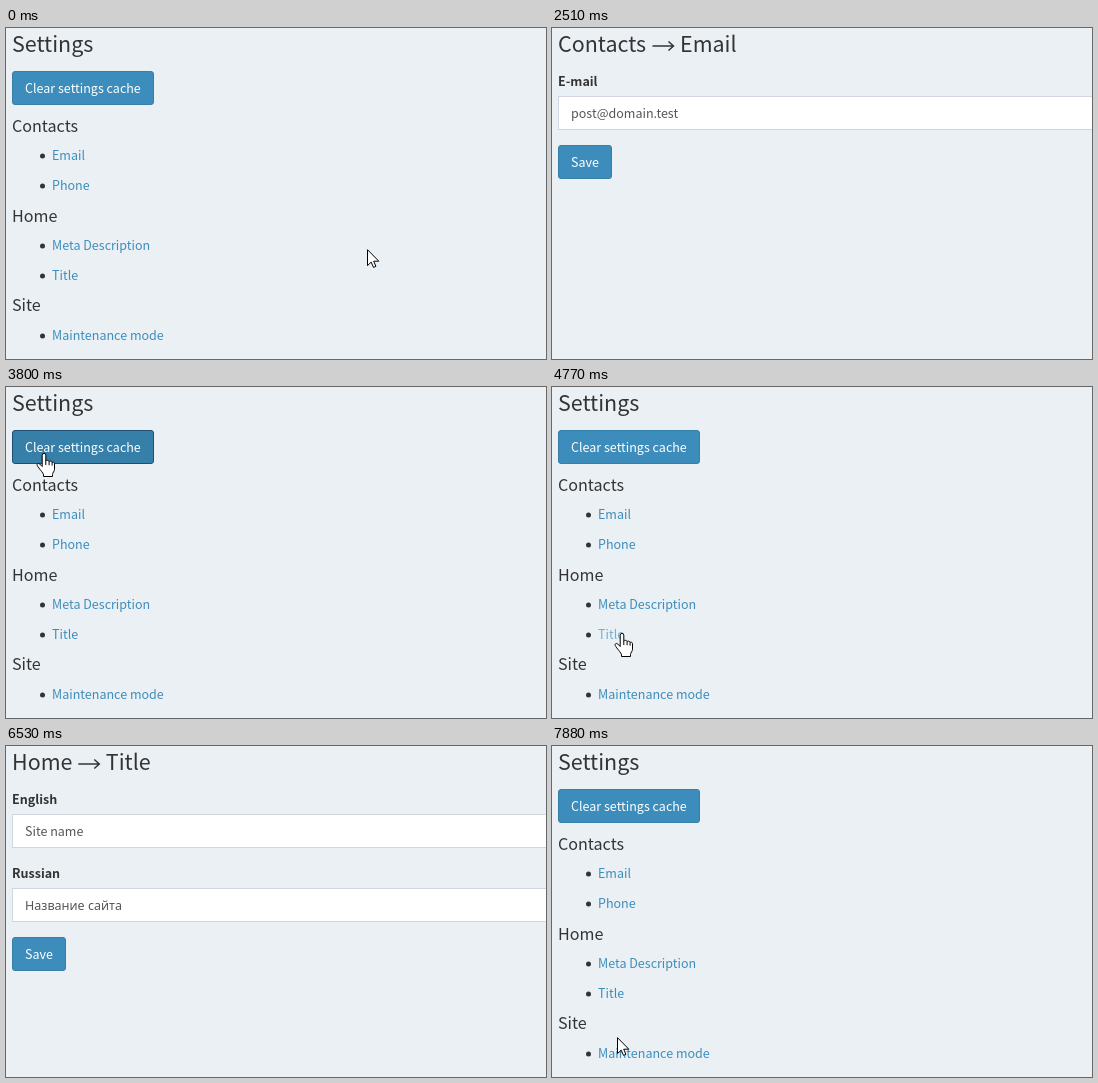
These frames come from a looping animation (540 by 331 pixels, 8000 ms). An HTML page:

```html
<!DOCTYPE html>
<html lang="en">
<head>
<meta charset="utf-8">
<title>Settings</title>
<style>
  html, body { margin: 0; height: 100%; overflow: hidden; background: #ebf0f4; }
  svg { display: block; width: 100vw; height: 100vh; }
  text { font: 12.53px "Noto Sans CJK JP", "Noto Sans CJK SC", "Noto Sans CJK", "Noto Sans", sans-serif; fill: #333; white-space: pre; }
  .title { font-size: 21.48px; }
  .group { font-size: 16.11px; }
  .label { font-weight: 700; }
  .link { fill: #3c8dbc; }
  .link.hover { fill: #72afd2; }
  .caption { fill: #fff; }
  .value { fill: #555; }
  .cyrillic { font-family: "Noto Sans", "Open Sans", sans-serif; font-size: 12.5px; }
  .field { fill: #fff; stroke: #d2d6de; }
  .button { fill: #3c8dbc; stroke: #367fa9; }
  .button.hover { fill: #367fa9; stroke: #204d74; }
  .bullet { fill: #333; }
  .arrow { fill: none; stroke: #333; stroke-width: 1.5; }
  .cursor { fill: #fff; stroke: #000; stroke-linejoin: round; }
  .ring { fill: none; }
</style>
</head>
<body>
<svg id="stage" viewBox="0 0 540 331" preserveAspectRatio="none"></svg>
<script>
const LOOP = 8000;
const stage = document.getElementById('stage');

const text = (x, y, cls, str) => `<text x="${x}" y="${y}" class="${cls}">${str}</text>`;

const box = (x, y, w, cls, radius = 0) =>
  `<rect x="${x + .5}" y="${y + .5}" width="${w - 1}" height="33" rx="${radius}" class="${cls}"/>`;

const button = (y, w, str, hover) =>
  box(6, y, w, hover ? 'button hover' : 'button', 2.5) + text(19, y + 22, 'caption', str);

const field = (y, label, value, cls = '') =>
  text(6, y, 'label', label) + box(6, y + 10, 560, 'field') +
  text(19, y + 32, 'value ' + cls, value);

const link = (y, str, hover) =>
  `<circle cx="36.5" cy="${y - 4}" r="2.5" class="bullet"/>` +
  text(46, y, hover === str ? 'link hover' : 'link', str);

const breadcrumb = (parent, arrowX, child) =>
  text(6, 24, 'title', parent) +
  `<path class="arrow" d="M${arrowX} 18h21m-5-4.5l5 4.5-5 4.5"/>` +
  text(arrowX + 27.5, 24, 'title', child);

const pages = {
  settings: hover =>
    text(6, 24, 'title', 'Settings') +
    button(43, 142, 'Clear settings cache', hover === 'button') +
    text(6, 104, 'group', 'Contacts') + link(132, 'Email', hover) + link(162, 'Phone', hover) +
    text(6, 194, 'group', 'Home') + link(222, 'Meta Description', hover) + link(252, 'Title', hover) +
    text(6, 283, 'group', 'Site') + link(312, 'Maintenance mode', hover),
  email: () =>
    breadcrumb('Contacts', 100.5, 'Email') +
    field(58, 'E-mail', 'post@domain.test') + button(117, 54, 'Save'),
  title: () =>
    breadcrumb('Home', 72.3, 'Title') +
    field(58, 'English', 'Site name') +
    field(132, 'Russian', 'Название сайта', 'cyrillic') + button(191, 54, 'Save'),
};

// Cursor outlines, with the hot spot at 0,0
const cursors = {
  arrow: 'M.5 .7V16.6l3.7-3.5 2.3 5.3 2.4-1-2.2-5.2h5.1z',
  hand: 'M.2 13.5V2.2a1.8 1.8 0 0 1 3.6 0V8c.3-1.1 3.1-1 3.3.7.4-1 2.8-.8 3 .9.5-.8 2.4-.6 2.4 1.2v5.4' +
    'c0 2.3-2 3.4-2 5.3v2H1.5v-1.7c0-1.8-5-6.6-6.2-9.2-.8-1.9 1.1-2.8 2.4-1.6z' +
    'M3.8 8v4M7.1 8.7v3.5M10.1 9.6v3',
};

const ring = (r, color) => `<circle cx="1.5" cy="1.5" r="${r}" class="ring" stroke="${color}"/>`;

const pointer = ({ cursor, x, y, click }) => cursor
  ? `<g transform="translate(${x} ${y})">${click ? ring(10, '#000') + ring(9, '#fff') : ''}` +
    `<path class="cursor" d="${cursors[cursor]}"/></g>`
  : '';

// Each step changes only the listed properties of the one before it
const steps = [
  [0, { page: 'settings', cursor: 'arrow', x: 361, y: 221 }],
  [280, { x: 350, y: 219 }],
  [430, { x: 262, y: 196 }],
  [550, { x: 150, y: 160 }],
  [680, { x: 72, y: 134 }],
  [800, { x: 78, y: 139 }],
  [940, { cursor: 'hand', x: 73, y: 129, hover: 'Email' }],
  [1090, { click: true }],
  [1210, { click: false }],
  [1330, { page: 'email', hover: '' }],
  [1450, { cursor: 'arrow' }],
  [2360, { x: 70, y: 124 }],
  [2510, { cursor: '' }],
  [3220, { page: 'settings' }],
  [3800, { cursor: 'hand', x: 36, y: 66, hover: 'button' }],
  [3920, { x: 72, y: 138, hover: 'Email' }],
  [4070, { cursor: 'arrow', x: 100, y: 195, hover: '' }],
  [4190, { x: 75, y: 241 }],
  [4340, { cursor: 'hand', x: 68, y: 246, hover: 'Title' }],
  [4500, { click: true }],
  [4770, { click: false }],
  [4890, { page: 'title', cursor: 'arrow', hover: '' }],
  [6530, { cursor: '' }],
  [7340, { page: 'settings' }],
  [7470, { cursor: 'hand', x: 70, y: 60, hover: 'button' }],
  [7610, { cursor: 'arrow', x: 89, y: 165, hover: '' }],
  [7760, { cursor: 'hand', x: 70, y: 243, hover: 'Title' }],
  [7880, { cursor: 'arrow', x: 65, y: 291, hover: '' }],
];

let state = {};
const timeline = steps.map(([time, change]) => ({ time, ...(state = { ...state, ...change }) }));

let shown;
function draw(now) {
  const time = now % LOOP;
  const current = timeline.findLast(step => step.time <= time) || timeline[0];
  if (current !== shown) {
    stage.innerHTML = pages[current.page](current.hover) + pointer(current);
    shown = current;
  }
}

const start = performance.now();
function tick() {
  draw(performance.now() - start);
  requestAnimationFrame(tick);
}
tick();
</script>
</body>
</html>
```
